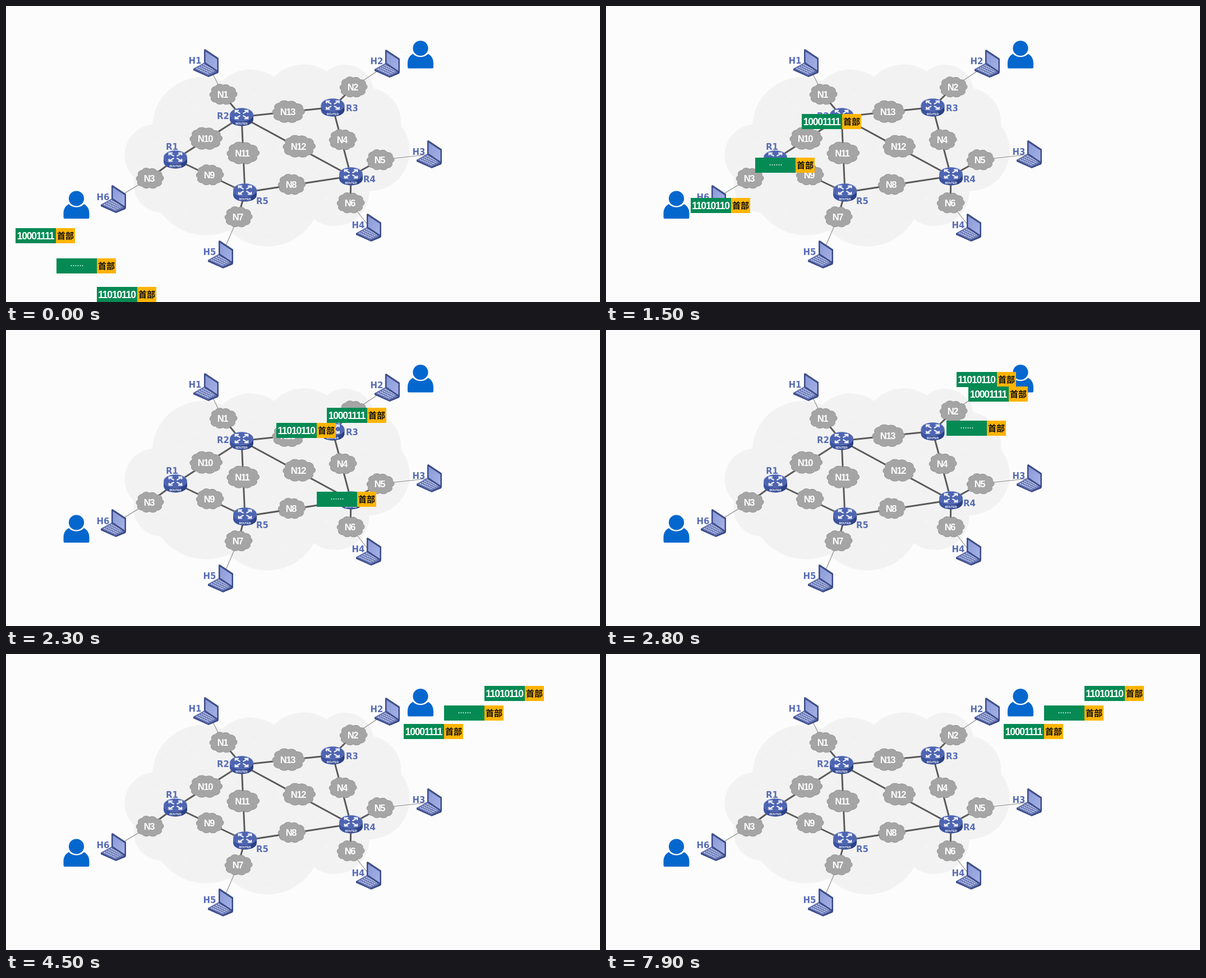
Recreate the animation shown at these times as an HTML page. Size 1059x529 px, loop 8 s.

```html
<!DOCTYPE html>
<html lang="zh">
<head>
<meta charset="utf-8">
<title>Packet switching</title>
<style>
  html, body { margin: 0; width: 100%; height: 100%; overflow: hidden; background: #fcfcfc; }
  svg { display: block; width: 1059px; height: 529px; }
  text { text-anchor: middle; font-weight: bold; font-kerning: none; }
  .label { font: bold 15px "DejaVu Sans", sans-serif; fill: #586db6; }
  .net { font: bold 16.5px "Liberation Sans", Arial, sans-serif; letter-spacing: -1.3px; fill: #fff; }
  .brand { font: bold 5px "Liberation Sans", Arial, sans-serif; fill: #fff; }
  .bits { font: bold 17.5px "Liberation Sans", Arial, sans-serif; letter-spacing: -1.15px; fill: #fff; }
  .dots { font: bold 12px "Noto Sans CJK SC", "Noto Sans CJK", sans-serif; fill: #fff; }
  .head { font: bold 15px "Noto Sans CJK SC", "Noto Sans CJK", sans-serif; fill: #111; }
  .link { stroke: #5a5a5a; stroke-width: 3; }
  .wire { stroke: #8a8a8a; stroke-width: 1.1; }
  .cloud { fill: #a5a5a5; stroke: #929292; stroke-width: 1; }
</style>
</head>
<body>
<svg viewBox="0 0 1059 529">
  <defs>
    <linearGradient id="side" x2="1">
      <stop stop-color="#3f57a4"/><stop offset=".5" stop-color="#334a94"/><stop offset="1" stop-color="#2b4083"/>
    </linearGradient>
    <linearGradient id="glass" x2="1" y2="1">
      <stop stop-color="#8b9ad8"/><stop offset="1" stop-color="#a5b2e6"/>
    </linearGradient>
    <path id="area" d="M261 212A90 90 0 0 1 386 134A71 71 0 0 1 478 127A73 73 0 0 1 572 117A51 51 0 0 1 655 147
      A62 62 0 0 1 704 214A72 72 0 0 1 648 331A62 62 0 0 1 549 381A95 95 0 0 1 398 401
      A101 101 0 0 1 276 369A50 50 0 0 1 229 307A55 55 0 0 1 261 212Z"/>
    <clipPath id="inside"><use href="#area"/></clipPath>
    <path id="arrow" d="M2.5 -1.8L10 -6.2M5 -7.2H11.3V-3.2" fill="none" stroke="#fff" stroke-width="2"/>
    <g id="router">
      <path d="M-21 -4V5A21 11.5 0 0 0 21 5V-4Z" fill="url(#side)"/>
      <ellipse cy="-4" rx="20.6" ry="11.5" fill="#4e65b2" stroke="#7286c6" stroke-width=".8"/>
      <g transform="translate(0 -4)">
        <use href="#arrow"/><use href="#arrow" transform="scale(-1 1)"/>
        <use href="#arrow" transform="scale(1 -1)"/><use href="#arrow" transform="scale(-1)"/>
      </g>
      <text class="brand" y="14">ROUTER</text>
    </g>
    <g id="laptop">
      <path d="M0 35L20 24L45 40L44 43L27 50L0 38Z" fill="#3c4c88"/>
      <path d="M1 35L20 24L43 40L26 47.5Z" fill="#6676b6"/>
      <path d="M6 34.6L28 44.3M10 32.2L32 42.5M14 30L36 40.4M18 27.7L39 38.6" stroke="#dbe1f5"
        stroke-width="1.6" stroke-dasharray="2.2 1.1"/>
      <path d="M19 1L21 0L45 16V41L43 41.5L19 25Z" fill="#3c4c88"/>
      <path d="M21.5 4L42.5 18V37.8L21.5 23.8Z" fill="url(#glass)"/>
    </g>
    <g id="person" fill="#0467cd">
      <circle r="13.6"/>
      <path d="M-21 36Q-23 36 -23 33V27C-23 18 -19 13 -13.5 10C-7 17.5 7 17.5 13.5 10C19 13 23 18 23 27V33Q23 36 21 36Z"/>
    </g>
  </defs>
  <use href="#area" fill="#f2f2f2"/>
  <g id="grain" clip-path="url(#inside)" stroke="#f6f6f6" stroke-width="1.2"></g>
  <g id="scene"></g>
  <g id="packets"></g>
</svg>
<script>
const LOOP = 8000, STEP = 100;
const $ = id => document.getElementById(id);
const at = (x, y) => `transform="translate(${x} ${y})"`;

const routers = { R1: [302, 274], R2: [420, 198], R3: [582.5, 181], R4: [615, 304], R5: [426, 333] };
const nets = {
  N1: [387, 158], N2: [619, 145], N3: [256, 308], N4: [600, 239], N5: [667, 275], N6: [614, 352], N7: [414, 377],
  N8: [509, 319], N9: [363, 302], N10: [356, 237], N11: [422, 263], N12: [522, 251], N13: [503, 189]
};
// top left corner of each laptop
const hosts = { H1: [334, 77], H2: [657, 78], H3: [732, 240], H4: [624, 371], H5: [360, 419], H6: [169, 320] };
const labels = {
  H1: [337, 97], H2: [661, 98], H3: [736, 260], H4: [628, 391], H5: [363, 439], H6: [173, 341],
  R1: [296, 251], R2: [387, 196], R3: [617, 182], R4: [648, 309], R5: [457, 348]
};
const links = 'R1-R2 R1-R5 R2-R3 R2-R4 R2-R5 R5-R4 R3-R4 N1-R2 N2-R3 N3-R1 N5-R4 N6-R4 N7-R5';
const wires = 'H1-N1 H2-N2 H3-N5 H4-N6 H5-N7 H6-N3';

const spot = id => routers[id] || nets[id] || hosts[id].map(v => v + 25);
const lines = (list, cls) => list.split(' ').map(pair => {
  const [[x1, y1], [x2, y2]] = pair.split('-').map(spot);
  return `<line class="${cls}" x1="${x1}" y1="${y1}" x2="${x2}" y2="${y2}"/>`;
}).join('');
const each = (map, draw) => Object.entries(map).map(([id, [x, y]]) => draw(id, x, y)).join('');

// a ring of arcs around an ellipse
function puff(rx, ry, bumps = 10) {
  let d = '';
  for (let i = 0; i <= bumps; i++) {
    const a = (i + .5) / bumps * 2 * Math.PI, k = .89 + .05 * Math.sin(i % bumps * 2.3);
    const p = `${(rx * k * Math.cos(a)).toFixed(1)} ${(ry * k * Math.sin(a)).toFixed(1)}`;
    d += i ? `A${rx * .34} ${ry * .34} 0 0 1 ${p}` : `M${p}`;
  }
  return d + 'Z';
}

function drawNet(id, x, y) {
  const shape = id.length > 2 ? puff(29, 20.5) : puff(24.5, 19);
  return `<g ${at(x, y)}><path class="cloud" d="${shape}"/><text class="net" x="-1" y="6">${id}</text></g>`;
}

$('scene').innerHTML = lines(wires, 'wire') + lines(links, 'link') + each(nets, drawNet) +
  each(routers, (id, x, y) => `<use href="#router" ${at(x, y)}/>`) +
  each(hosts, (id, x, y) => `<use href="#laptop" ${at(x, y)}/>`) +
  each(labels, (id, x, y) => `<text class="label" x="${x}" y="${y + 5.5}">${id}</text>`) +
  `<use href="#person" ${at(125.5, 344)}/><use href="#person" ${at(739, 75.5)}/>`;

let seed = 7;
const rand = () => (seed = seed * 16807 % 2147483647) / 2147483647;
let grain = '';
for (let i = 0; i < 420; i++) {
  const x = 214 + rand() * 504, y = 105 + rand() * 325;
  grain += `M${x.toFixed(1)} ${y.toFixed(1)}l${(2 + rand() * 5).toFixed(1)} ${(rand() * 5 - 3).toFixed(1)}`;
}
$('grain').innerHTML = `<path d="${grain}"/>`;

// route points: x, y and, where the pace is pinned, a time
const packets = [
  { text: '11010110', route: [[215, 515, 1230], [204, 356, 1500], [302, 273], [420, 196], [535, 179, 2300],
    [582, 180], [678, 88, 2800], [871, 72, 3700], [906, 70, 4290]] },
  { text: '……', route: [[143, 464, 900], [193, 345], [302, 273], [319, 284, 1500], [426, 332], [607, 302, 2300],
    [660, 175, 2800], [680, 106], [778, 102, 3700], [834, 105, 4500]] },
  { text: '10001111', route: [[70, 410, 600], [193, 345], [302, 273], [402, 206, 1500], [420, 196], [582, 180],
    [625, 152, 2300], [680, 104], [699, 114, 2800], [762, 138, 3720]] }
];

function prepare(p) {
  let len = 0;
  p.stops = p.route.map(([x, y], i) => {
    if (i) len += Math.hypot(x - p.route[i - 1][0], y - p.route[i - 1][1]);
    return len;
  });
  p.pins = p.route.map((q, i) => ({ t: q[2], s: p.stops[i] })).filter(k => k.t !== undefined);
  const k = p.pins, n = k.length;
  const rate = i => (k[i + 1].s - k[i].s) / (k[i + 1].t - k[i].t);
  for (let i = 1; i < n - 1; i++) {
    const a = k[i].t - k[i - 1].t, b = k[i + 1].t - k[i].t;
    k[i].v = (rate(i - 1) * b + rate(i) * a) / (a + b);
  }
  k[0].v = Math.max(0, 2 * rate(0) - k[1].v);
  k[n - 1].v = 0;
  const word = p.text === '……' ? '<text class="dots" x="-16.5" y="4.5">……</text>'
    : `<text class="bits" x="-17.5" y="6.5">${p.text}</text>`;
  p.el = document.createElementNS('http://www.w3.org/2000/svg', 'g');
  p.el.innerHTML = `<rect x="-53" y="-13" width="72" height="27" fill="#058a54"/>` +
    `<rect x="19" y="-13" width="34" height="27" fill="#ffb401"/>${word}<text class="head" x="36" y="6">首部</text>`;
  $('packets').append(p.el);
}

// distance travelled: cubic Hermite between pins
function travelled(k, t) {
  if (t <= k[0].t) return 0;
  const i = k.findIndex(q => q.t > t);
  if (i < 0) return k[k.length - 1].s;
  const a = k[i - 1], b = k[i], h = b.t - a.t, u = (t - a.t) / h, w = 1 - u;
  return a.s * (1 + 2 * u) * w * w + b.s * u * u * (3 - 2 * u) + h * u * w * (a.v * w - b.v * u);
}

function place(p, t) {
  const s = travelled(p.pins, t);
  let i = p.stops.findIndex(d => d >= s - 1e-6);
  i = Math.max(1, i < 0 ? p.stops.length - 1 : i);
  const u = (s - p.stops[i - 1]) / (p.stops[i] - p.stops[i - 1]);
  const [x, y] = [0, 1].map(c => p.route[i - 1][c] + (p.route[i][c] - p.route[i - 1][c]) * u);
  p.el.setAttribute('transform', `translate(${x.toFixed(2)} ${y.toFixed(2)})`);
}

packets.forEach(prepare);
const start = performance.now();
function tick() {
  const t = Math.floor((performance.now() - start) % LOOP / STEP) * STEP;
  packets.forEach(p => place(p, t));
  requestAnimationFrame(tick);
}
tick();
</script>
</body>
</html>
```
